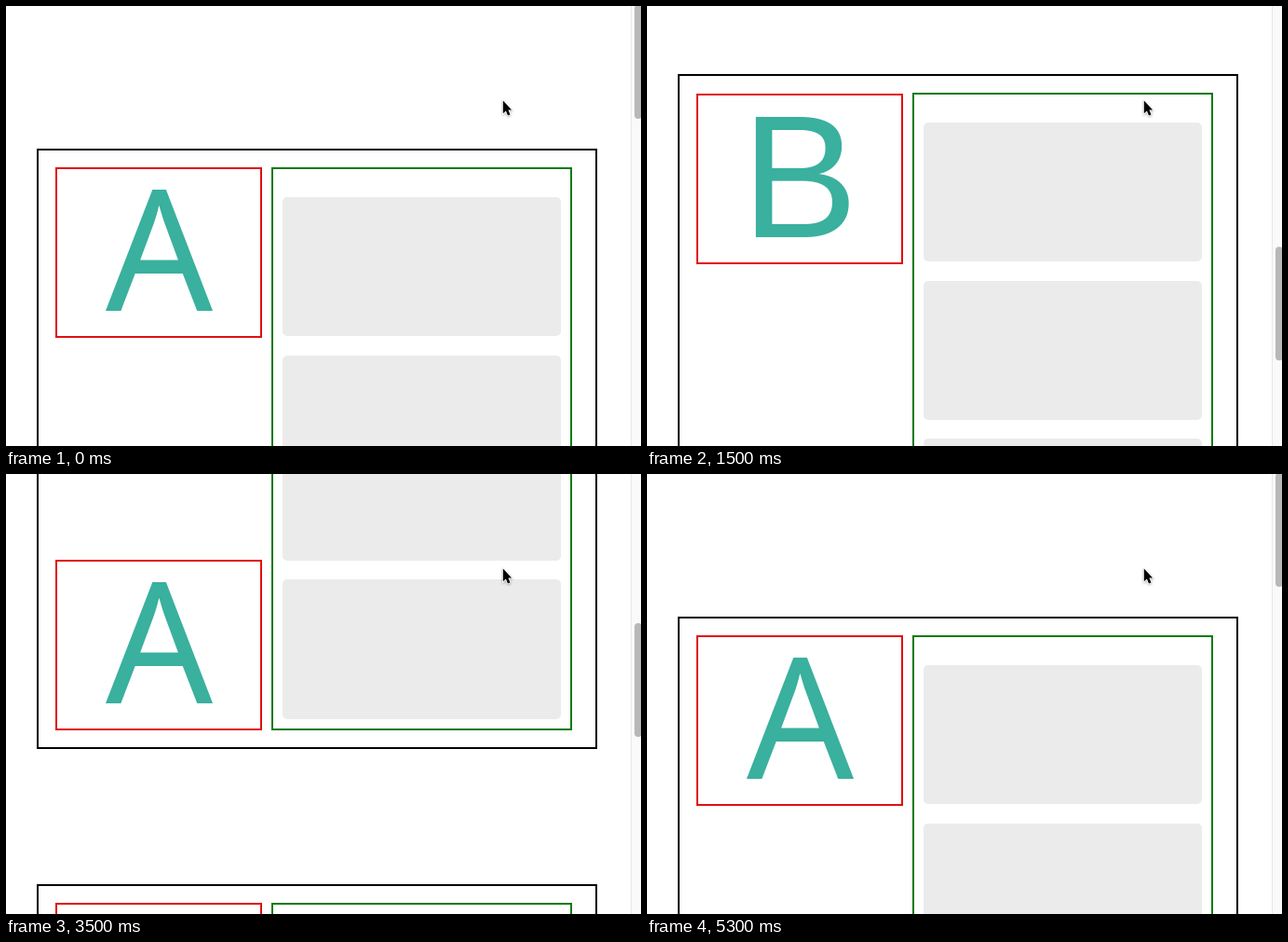
Animation, 682 px wide and 472 px high, one loop 5800 ms. Source, as an HTML page:

```html
<!DOCTYPE html>
<html lang="en">
<head>
<meta charset="utf-8">
<title>Sticky columns</title>
<style>
  html, body { margin: 0; width: 100%; height: 100%; overflow: hidden; background: #fff; }
  * { box-sizing: border-box; }
  #stage { position: relative; width: 682px; height: 472px; overflow: hidden; }
  #view { position: absolute; inset: 0; overflow: hidden; }
  #page { position: relative; height: 1930px; }
  section {
    position: absolute; left: 33px; top: 153px; width: 602px; height: 743px;
    border: 2px solid #000;
  }
  section + section { top: 1041px; }
  .side { position: absolute; left: 18px; top: 18px; bottom: 18px; width: 222px; }
  .sticky {
    position: sticky; top: 94px; height: 183px;
    border: 2px solid #e01010;
  }
  .sticky svg { position: absolute; left: -2px; top: -2px; width: 222px; height: 183px; }
  text { fill: #3ab09e; }
  .a { font: 180.3px "Noto Sans", sans-serif; }
  .b { font: 187.5px "Liberation Sans", Arial, sans-serif; }
  .list {
    position: absolute; left: 250px; top: 18px; bottom: 18px; width: 323px;
    border: 2px solid #0b7a12;
  }
  .card {
    position: absolute; left: 10px; top: calc(29.75px + var(--i) * 169.75px);
    width: 299px; height: 149.5px; border-radius: 5px; background: #ebebeb;
  }
  #track {
    position: absolute; left: 671px; top: 0; width: 16px; height: 472px;
    background: #fafafa; border-left: 1px solid #e8e8e8;
  }
  #thumb {
    position: absolute; left: 3px; top: -1px; width: 8px; height: 121.7px;
    border-radius: 4px; background: #b8b8b8;
  }
  #cursor {
    position: absolute; left: 528px; top: 96px; width: 22px; height: 28px;
    filter: drop-shadow(0 1px 1px rgba(0, 0, 0, .3));
  }
</style>
</head>
<body>
<div id="stage">
  <div id="view">
    <div id="page">
      <section>
        <div class="side"><div class="sticky"><svg><text class="a" x="54" y="153.7">A</text></svg></div></div>
        <div class="list"></div>
      </section>
      <section>
        <div class="side"><div class="sticky"><svg><text class="b" x="48.6" y="153.8">B</text></svg></div></div>
        <div class="list"></div>
      </section>
    </div>
  </div>
  <div id="track"><div id="thumb"></div></div>
  <svg id="cursor">
    <path d="M5.8 5.6V19.3L8.9 16.4L11 21.4L13.5 20.4L11.4 15.5H15.2Z"
      stroke="#fff" stroke-width="1.6" paint-order="stroke"/>
  </svg>
</div>
<script>
  const LOOP = 5800, STEP = 100;
  // [time in ms, scroll offset in px]
  const keys = [
    [0, 0], [600, 282], [1100, 630], [1500, 968], [1800, 1212], [2200, 1266],
    [2500, 1267], [2600, 1267], [3100, 921], [4000, 218.5], [4400, 0], [LOOP, 0]
  ];
  const view = document.getElementById('view');
  const thumb = document.getElementById('thumb');

  for (const list of document.querySelectorAll('.list')) {
    for (let i = 0; i < 4; i++) {
      const card = document.createElement('div');
      card.className = 'card';
      card.style.setProperty('--i', i);
      list.append(card);
    }
  }

  const slope = i => (keys[i + 1][1] - keys[i][1]) / (keys[i + 1][0] - keys[i][0]);

  // Harmonic mean of the neighbouring slopes keeps the curve monotone.
  function tangent(i) {
    if (i === 0 || i === keys.length - 1) return 0;
    const a = slope(i - 1), b = slope(i);
    return a * b > 0 ? 2 * a * b / (a + b) : 0;
  }

  function scrollAt(t) {
    const i = keys.findIndex((k, n) => n < keys.length - 1 && t < keys[n + 1][0]);
    const [t0, y0] = keys[i], [t1, y1] = keys[i + 1];
    const span = t1 - t0, u = (t - t0) / span;
    return y0 + (y1 - y0) * u * u * (3 - 2 * u)
      + span * u * (1 - u) * ((1 - u) * tangent(i) - u * tangent(i + 1));
  }

  const start = performance.now();
  function draw() {
    const t = (performance.now() - start) % LOOP;
    const y = scrollAt(Math.floor(t / STEP) * STEP);
    view.scrollTop = Math.round(y);
    thumb.style.transform = `translateY(${y / 3.735}px)`;
    requestAnimationFrame(draw);
  }
  draw();
</script>
</body>
</html>
```
